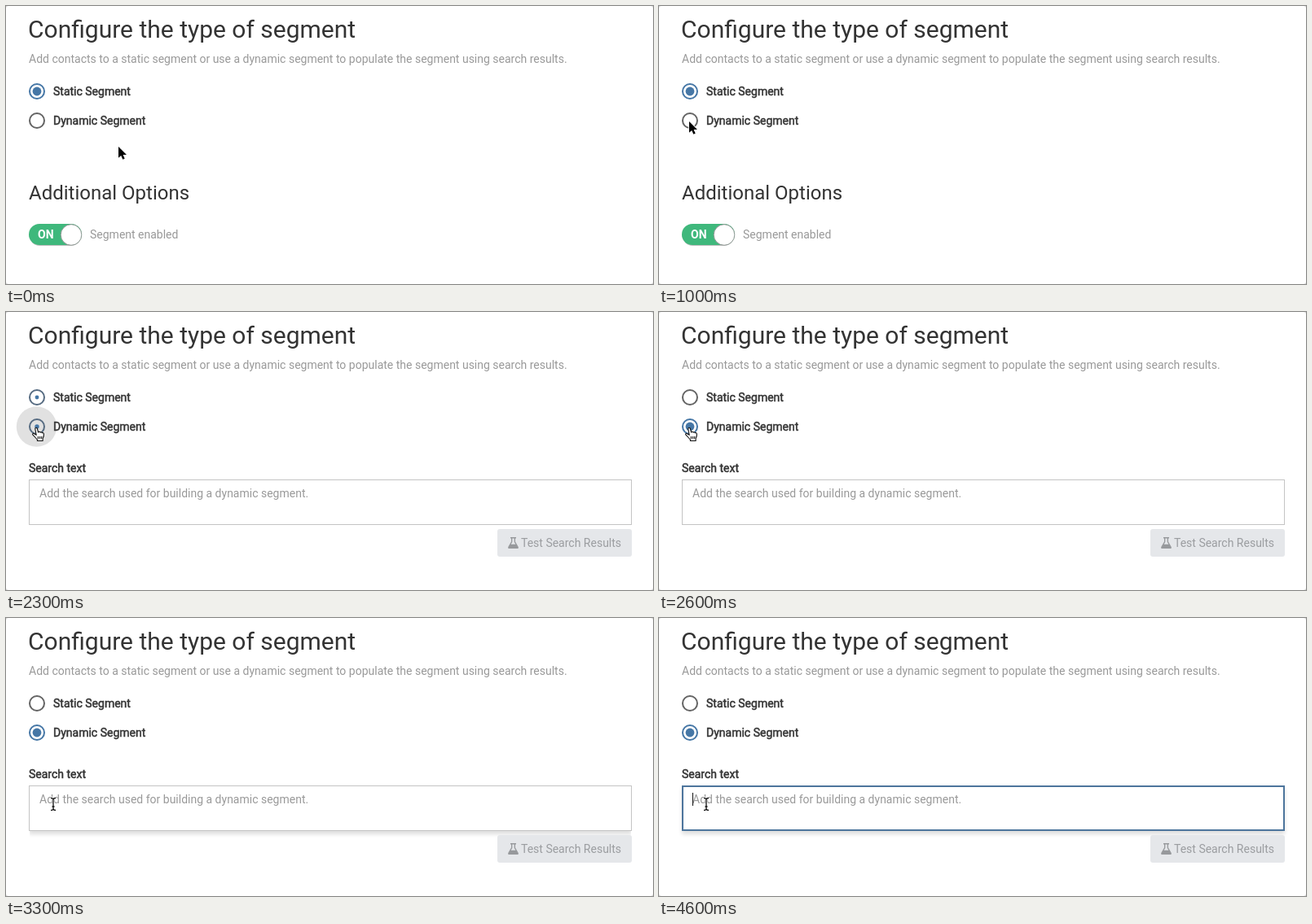
Animation, 794 px wide and 342 px high, one loop 4800 ms. Source, as an HTML page:

```html
<!DOCTYPE html>
<html lang="en">
<head>
<meta charset="utf-8">
<title>Segment type</title>
<style>
  html, body { margin: 0; width: 100%; height: 100%; overflow: hidden; background: #d2d2d2; }
  svg { display: block; width: 794px; height: 342px; }
  text { font: 14px Roboto, Arial, sans-serif; fill: #999; }
  .title { font-size: 30px; fill: #333; }
  .heading { font-size: 24px; fill: #333; }
  .label { fill: #333; stroke: #333; stroke-width: .5px; }
  .on { font-weight: 700; fill: #fff; }
  .box { fill: #fff; stroke: #c4c4c4; }
  .ring { fill: none; stroke-width: 2; }
  .dot { fill: #4677a6; }

  /* Every part runs on the same 4.8 s clock with hard steps. */
  .a { animation: 4.8s step-end infinite; }
  .options { animation-name: options; }
  .search { animation-name: search; }
  .ring.off { animation-name: ring-off; }
  .ring.pick { animation-name: ring-pick; }
  .dot.off { animation-name: dot-off; }
  .dot.pick { animation-name: dot-pick; }
  .ripple { animation-name: ripple; }
  .shade { animation-name: shade; }
  .focus { animation-name: focus; }
  .caret { animation-name: caret; }
  .cursor { animation-name: move; }
  .arrow { animation-name: arrow; }
  .hand { animation-name: hand; }
  .beam { animation-name: beam; }

  @keyframes options { 0% { opacity: 1 } 47.91%, 100% { opacity: 0 } }
  @keyframes search { 0% { opacity: 0 } 47.91%, 100% { opacity: 1 } }
  @keyframes ring-off {
    0% { stroke: #4677a6 } 47.91% { stroke: #576c82 }
    50% { stroke: #626568 } 52.08%, 100% { stroke: #646464 }
  }
  @keyframes ring-pick {
    0% { stroke: #646464 } 47.91% { stroke: #576c82 }
    50% { stroke: #4a759f } 52.08%, 100% { stroke: #4677a6 }
  }
  @keyframes dot-off {
    0% { r: 5.4px } 47.91% { r: 2.4px } 50% { r: .5px } 52.08%, 100% { r: 0px }
  }
  @keyframes dot-pick {
    0% { r: 0px } 47.91% { r: 2.7px } 50% { r: 5px } 52.08%, 100% { r: 5.4px }
  }
  @keyframes ripple {
    0% { opacity: 0 } 47.91% { opacity: 1 } 50% { opacity: .7 }
    52.08% { opacity: .3 } 54.16%, 100% { opacity: 0 }
  }
  @keyframes shade { 0% { opacity: 0 } 68.75% { opacity: 1 } 75%, 100% { opacity: 0 } }
  @keyframes focus { 0% { opacity: 0 } 75%, 100% { opacity: 1 } }
  @keyframes caret {
    0% { opacity: 0 } 75% { opacity: 1 } 85.41% { opacity: 0 } 95.83%, 100% { opacity: 1 }
  }
  @keyframes move {
    0% { transform: translate(138px, 173px) }
    6.25% { transform: translate(134px, 172px) }
    8.33% { transform: translate(117px, 167px) }
    10.41% { transform: translate(91px, 160px) }
    12.5% { transform: translate(63px, 152px) }
    14.58% { transform: translate(44px, 147px) }
    16.66% { transform: translate(38px, 145px) }
    18.75% { transform: translate(37px, 143px) }
    20.83% { transform: translate(37px, 142px) }
    60.41% { transform: translate(39px, 150px) }
    62.5% { transform: translate(47px, 190px) }
    64.58% { transform: translate(55px, 222px) }
    66.66% { transform: translate(57px, 227px) }
    68.75%, 100% { transform: translate(58px, 229px) }
  }
  @keyframes arrow {
    0% { opacity: 1 } 45.83% { opacity: 0 } 62.5% { opacity: 1 } 64.58%, 100% { opacity: 0 }
  }
  @keyframes hand { 0% { opacity: 0 } 45.83% { opacity: 1 } 62.5%, 100% { opacity: 0 } }
  @keyframes beam { 0% { opacity: 0 } 64.58%, 100% { opacity: 1 } }
</style>
</head>
<body>
<svg viewBox="0 0 794 342">
  <defs>
    <filter id="blur" x="-5%" y="-50%" width="110%" height="200%"><feGaussianBlur stdDeviation="2.5"/></filter>
    <clipPath id="below"><rect x="29" y="262" width="738" height="14"/></clipPath>
    <rect id="glow" x="28" y="210" width="740" height="56" opacity=".13" filter="url(#blur)"/>
    <path id="ibeam" d="M-3 -7.5 Q0 -7.5 0 -5.5 Q0 -7.5 3 -7.5 M0 -6 V6 M-3 7.5 Q0 7.5 0 5.5 Q0 7.5 3 7.5 M-1.5 3 H1.5" fill="none"/>
  </defs>

  <rect width="794" height="342" rx="3" fill="#fff"/>
  <text class="title" x="27" y="39">Configure the type of segment</text>
  <text x="28" y="70">Add contacts to a static segment or use a dynamic segment to populate the segment using search results.</text>

  <circle class="a ripple" cx="37.5" cy="141" r="24.7" fill="#e1e1e1"/>
  <circle class="a ring off" cx="38" cy="105" r="9"/>
  <circle class="a dot off" cx="38" cy="105"/>
  <text class="label" x="58" y="110">Static Segment</text>
  <circle class="a ring pick" cx="38" cy="141" r="9"/>
  <circle class="a dot pick" cx="38" cy="141"/>
  <text class="label" x="58" y="146">Dynamic Segment</text>

  <g class="a options">
    <text class="heading" x="28" y="238">Additional Options</text>
    <rect x="28.5" y="269" width="64" height="26" rx="13" fill="#bbb"/>
    <rect x="28" y="268" width="65" height="26" rx="13" fill="#3fb87c"/>
    <circle cx="80" cy="281.5" r="12.8" fill="#fff" stroke="#8e9692"/>
    <text class="on" x="39" y="286">ON</text>
    <text x="103" y="286">Segment enabled</text>
  </g>

  <g class="a search">
    <text class="label" x="28" y="197">Search text</text>
    <g class="a shade" clip-path="url(#below)"><use href="#glow"/></g>
    <g class="a focus"><use href="#glow"/></g>
    <rect class="box" x="28.5" y="206.5" width="739" height="55"/>
    <rect class="a focus" x="29" y="207" width="738" height="54" fill="#fff" stroke="#4d759c" stroke-width="2"/>
    <text x="41" y="228">Add the search used for building a dynamic segment.</text>
    <rect class="a caret" x="41" y="215" width="1" height="16" fill="#111"/>
    <rect x="603" y="267" width="165" height="34" rx="3" fill="#e5e7ea"/>
    <path d="M619 277h7v1.5h-1v4l3.6 6.2q1 2.3-1.4 2.3h-9.4q-2.4 0-1.4-2.3l3.6-6.2v-4h-1z" fill="#97999c"/>
    <path d="M621.3 278.5h2.4v4.4l1.7 2.8h-5.8l1.7-2.8z" fill="#e5e7ea"/>
    <text x="632" y="289" style="fill:#9b9da0">Test Search Results</text>
  </g>

  <g class="a cursor">
    <path class="a arrow" d="M0 0V13.8L3.2 10.9 5.3 15.7 7.7 14.7 5.6 9.9H10Z" stroke="#fff" stroke-width="1.6" paint-order="stroke"/>
    <g class="a hand" stroke="#111" stroke-width="1.1" stroke-linejoin="round">
      <path fill="#fff" d="M-1.2 1.8C-1.5.2 1 0 1.4 1.5L2.6 6C3 5 4.8 5 5.1 6.2 5.7 5.4 7 5.6 7.3 6.8 8.1 6.2 9.3 6.6 9.4 8 9.6 10.8 8.8 12 8.1 13.8V16.5H1.4V14.8C-.6 13-2 11-4 9.2-5.2 7.8-3.5 6.8-2.3 7.7L.2 9.4Z"/>
      <path d="M2.4 11V14M4.6 11V14M6.7 11V14"/>
    </g>
    <g class="a beam">
      <use href="#ibeam" stroke="#fff" stroke-width="2.8"/>
      <use href="#ibeam" stroke="#111" stroke-width="1.3"/>
    </g>
  </g>
</svg>
</body>
</html>
```
